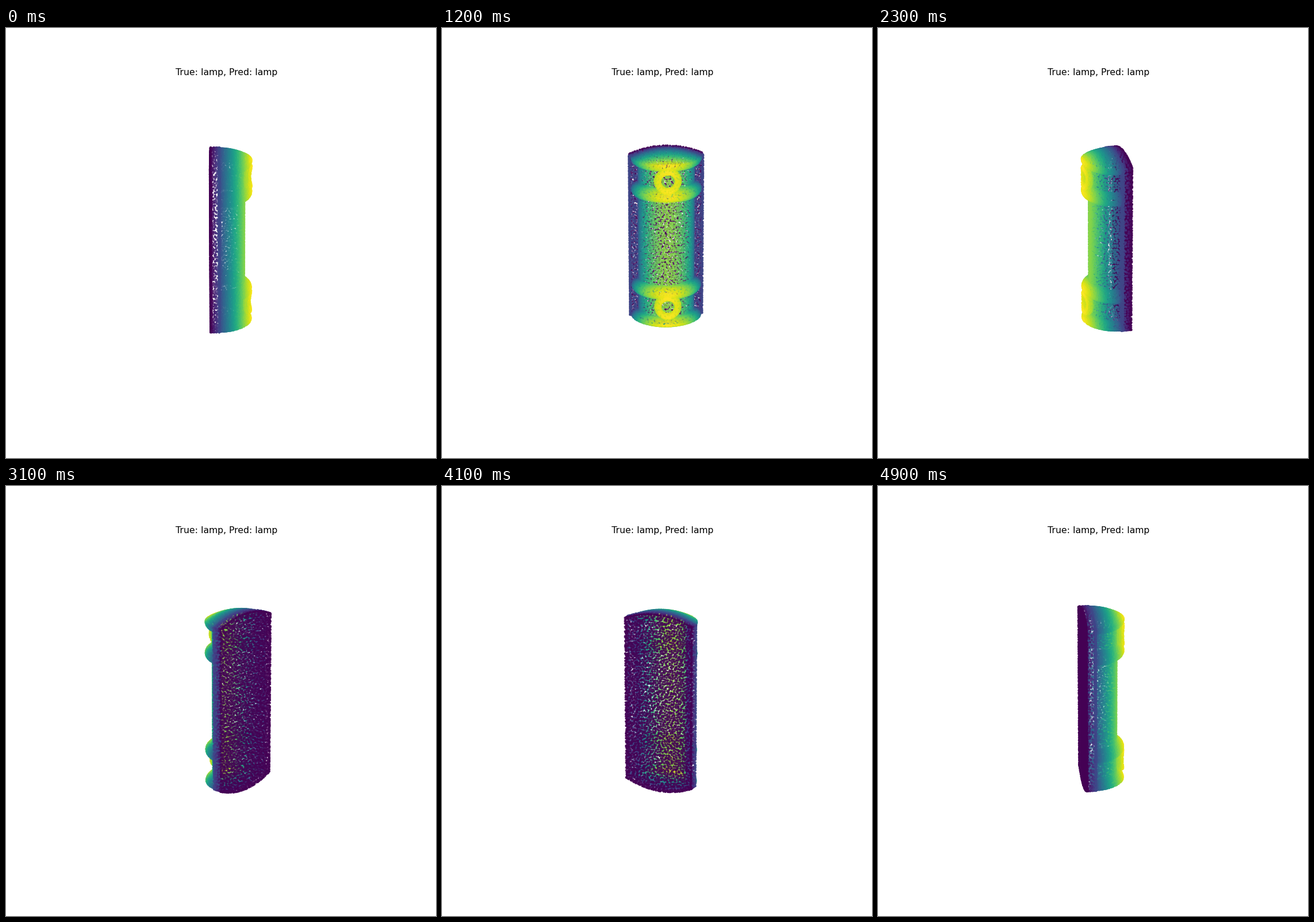
These frames come from a looping animation (748x748 px, 5 s). A matplotlib script:

```python
import numpy as np
import matplotlib.pyplot as plt
from matplotlib.animation import FuncAnimation

FRAMES = 50
BACK, FRONT = -35, -20      # depth of the wall plate's two faces
HALF_WIDTH, BEVEL = 64, 1.5
BODY = (48, 43)             # half axes of the glass body
LIP = 12                    # how far caps and collars stick out
rng = np.random.default_rng(4)


def sheet(width, height, step):
    """Evenly spread, slightly shaken points (u, v) in the unit square."""
    n = max(2, round(width / step) + 1)
    m = max(2, round(height / step) + 1)
    u, v = np.meshgrid(np.linspace(0, 1, n), np.linspace(0, 1, m))
    u = u + (np.arange(m) % 2)[:, None] * 0.5 / (n - 1)
    u = u + rng.uniform(-0.36, 0.36, u.shape) / (n - 1)
    v = v + rng.uniform(-0.36, 0.36, v.shape) / (m - 1)
    return np.clip(u, 0, 1).ravel(), np.clip(v, 0, 1).ravel()


def points(x, y, z):
    return np.column_stack(np.broadcast_arrays(x, y, z))


def plate_top(x):
    return 162 - 14 * (x / HALF_WIDTH) ** 2


def plate_bottom(x):
    return -160.5 + 15 * (x / HALF_WIDTH) ** 2


def panel(x0, x1, y, step=3.8):
    u, v = sheet(abs(x1 - x0), 300, step)
    x = x0 + (x1 - x0) * u
    low, high = plate_bottom(x), plate_top(x)
    return points(x, y, low + (high - low) * v)


def plate_side(sign):
    u, v = sheet(FRONT - BACK, 295, 4.8)
    x = sign * (HALF_WIDTH - BEVEL * (1 - u))
    low, high = plate_bottom(x), plate_top(x)
    return points(x, BACK + (FRONT - BACK) * u, low + (high - low) * v)


def plate_end(edge):
    u, v = sheet(2 * HALF_WIDTH, FRONT - BACK, 4.6)
    x = (HALF_WIDTH - BEVEL * (1 - v)) * (2 * u - 1)
    return points(x, BACK + (FRONT - BACK) * v, edge(x))


def body():
    u, v = sheet(145, 280, 3.8)
    a = np.pi * u
    return points(BODY[0] * np.cos(a), FRONT + BODY[1] * np.sin(a),
                  280 * v - 140)


def lip(z, start, end, height=11):
    """Rounded rim around the body; start and end are profile angles."""
    u, v = sheet(165, 12 * abs(end - start), 3.2)
    a = np.pi * u
    s = start + (end - start) * v
    out = LIP * np.cos(s)
    return points((BODY[0] + out) * np.cos(a),
                  FRONT + (BODY[1] + out) * np.sin(a),
                  z + height * np.sin(s))


def dome(rim, rise):
    width, depth = BODY[0] + LIP, BODY[1] + LIP
    u, v = sheet(2 * width, depth, 3.2)
    x, y = 2 * u - 1, v
    rho = x ** 2 + y ** 2
    keep = rho <= 1
    return points(width * x, FRONT + depth * y, rim + rise * (1 - rho))[keep]


def ring(z, major=17.5, minor=4.5):
    """Torus bent slightly backwards along the curve of the body."""
    u, v = sheet(2 * np.pi * major, 2 * np.pi * minor, 3.2)
    a, b = 2 * np.pi * u, 2 * np.pi * v
    r = major + minor * np.cos(b)
    x = r * np.cos(a)
    y = 31 + minor * np.sin(b) - 2.8 * (x / major) ** 2
    return points(x, y, z + r * np.sin(a))


quarter = np.pi / 2
back_width = HALF_WIDTH - BEVEL
cloud = np.vstack([
    panel(-back_width, back_width, BACK),
    panel(-HALF_WIDTH, -BODY[0], FRONT),
    panel(BODY[0], HALF_WIDTH, FRONT),
    plate_side(-1), plate_side(1),
    plate_end(plate_top), plate_end(plate_bottom),
    body(),
    dome(147, 15), lip(147, -quarter, 0),
    dome(-146, -14), lip(-146, 0, quarter),
    lip(91, -quarter, quarter), lip(-87, -quarter, quarter),
    ring(118), ring(-112),
])

fig = plt.figure(figsize=(8, 8), dpi=93.5)
ax = fig.add_subplot(projection="3d")
ax.set_box_aspect((1, 1, 1))
ax.set(xlim=(-1, 1), ylim=(-1, 1), zlim=(-1, 1))
ax.set_axis_off()
ax.set_title("True: lamp, Pred: lamp")

# The model is measured in screen pixels; half the box spans 171.3 of them.
x, y, z = cloud.T * ax.get_xlim()[1] / 171.3
ax.scatter(x, y, z, c=y, cmap="viridis", s=5, alpha=0.8)


def update(i):
    ax.view_init(elev=20, azim=i * 360 / FRAMES)
    return ()


anim = FuncAnimation(fig, update, frames=FRAMES, interval=100,
                     repeat=True, repeat_delay=0)
plt.show()
```
